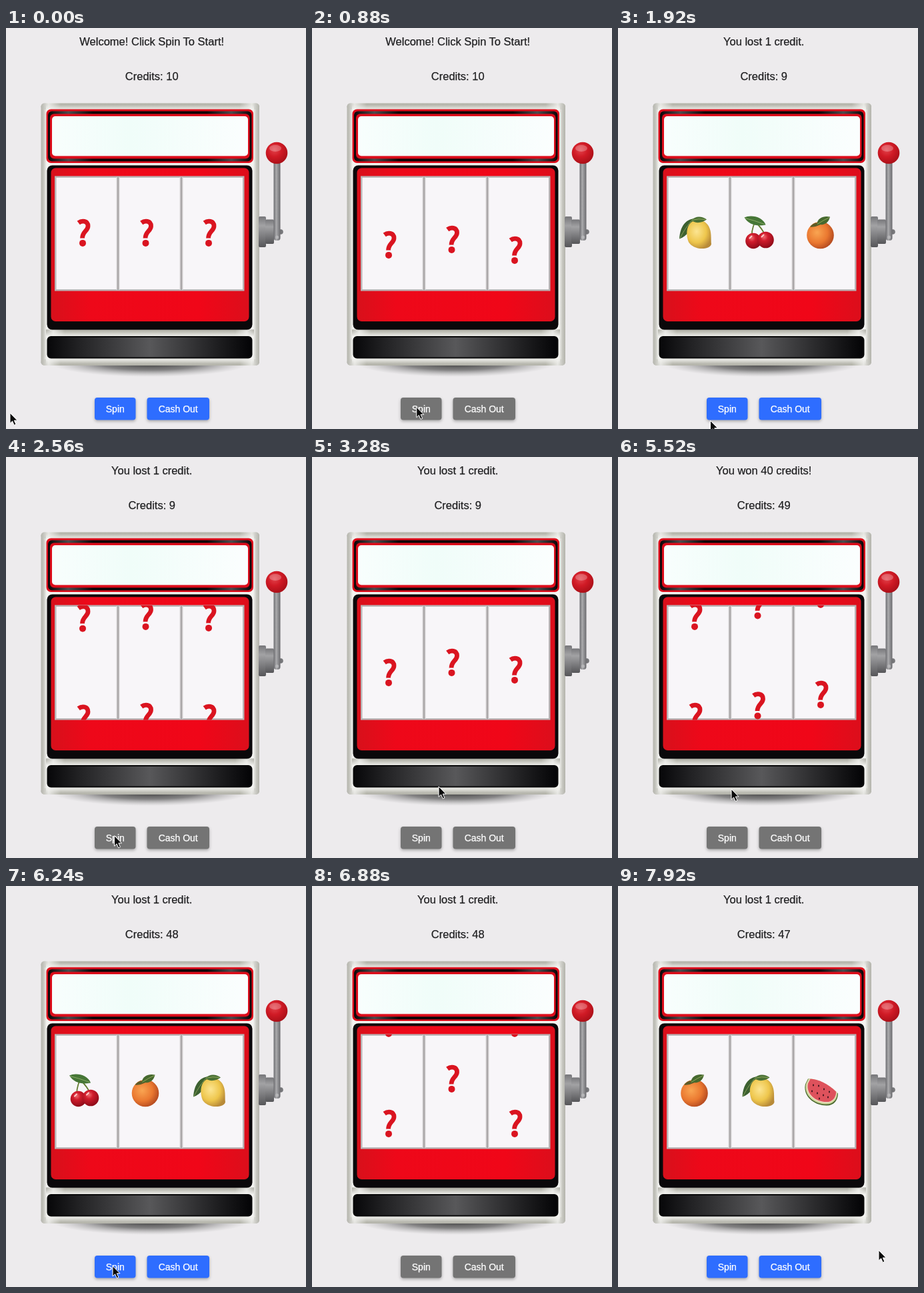
These frames come from a looping animation (450x600 px, 8 s). An HTML page:

```html
<!DOCTYPE html>
<html lang="en">
<head>
<meta charset="utf-8">
<title>Slot machine</title>
<style>
html, body { margin: 0; width: 100%; height: 100%; overflow: hidden; background: #edebed; }
svg { display: block; width: 450px; height: 600px; }
text { font-family: "Liberation Sans", Arial, sans-serif; text-anchor: middle; stroke-width: .25px; }
.line { font-size: 16.5px; fill: #202022; stroke: #202022; }
.label { font-size: 14px; fill: #fff; stroke: #fff; }
.button { fill: #2e6dff; filter: drop-shadow(0 2px 2px rgba(0,0,0,.3)); }
.busy .button { fill: #747474; }
</style>
</head>
<body>
<svg id="stage" viewBox="0 0 450 600">
  <defs>
    <linearGradient id="shell">
      <stop offset="0" stop-color="#b4b4ac"/><stop offset=".012" stop-color="#c6c6bf"/>
      <stop offset=".026" stop-color="#f4f4f1"/><stop offset=".5" stop-color="#f0f0ed"/>
      <stop offset=".972" stop-color="#f4f4f1"/><stop offset=".987" stop-color="#c6c6bf"/>
      <stop offset="1" stop-color="#b4b4ac"/>
    </linearGradient>
    <linearGradient id="band">
      <stop offset="0" stop-color="#b4b4ac"/><stop offset=".035" stop-color="#e6e6e2"/>
      <stop offset=".09" stop-color="#b3b3a9"/><stop offset=".91" stop-color="#b3b3a9"/>
      <stop offset=".965" stop-color="#e6e6e2"/><stop offset="1" stop-color="#b4b4ac"/>
    </linearGradient>
    <linearGradient id="fade" x2="0" y2="1">
      <stop offset="0" stop-color="#f4f4f1" stop-opacity="0"/><stop offset=".3" stop-color="#f4f4f1" stop-opacity=".1"/>
      <stop offset="1" stop-color="#f4f4f1" stop-opacity=".9"/>
    </linearGradient>
    <linearGradient id="steel">
      <stop offset="0" stop-color="#6c6c70"/><stop offset=".4" stop-color="#aaaaac"/><stop offset="1" stop-color="#6a6a6e"/>
    </linearGradient>
    <linearGradient id="mount" x2="0" y2="1">
      <stop offset="0" stop-color="#77777a"/><stop offset=".3" stop-color="#a2a2a4"/><stop offset="1" stop-color="#565659"/>
    </linearGradient>
    <linearGradient id="tray">
      <stop offset="0" stop-color="#08080a"/><stop offset=".15" stop-color="#222224"/>
      <stop offset=".5" stop-color="#58585a"/><stop offset=".85" stop-color="#1c1c1e"/><stop offset="1" stop-color="#040406"/>
    </linearGradient>
    <linearGradient id="rim">
      <stop offset="0" stop-color="#0c0405"/><stop offset=".1" stop-color="#4c4c4e"/><stop offset=".22" stop-color="#0a0506"/>
      <stop offset=".78" stop-color="#0a0506"/><stop offset=".9" stop-color="#4c4c4e"/><stop offset="1" stop-color="#0c0405"/>
    </linearGradient>
    <linearGradient id="red">
      <stop offset="0" stop-color="#d8101b"/><stop offset=".2" stop-color="#ee0819"/>
      <stop offset=".75" stop-color="#f00618"/><stop offset="1" stop-color="#dc0e1b"/>
    </linearGradient>
    <linearGradient id="glass">
      <stop offset="0" stop-color="#f8fefd"/><stop offset=".4" stop-color="#f0fdf9"/><stop offset="1" stop-color="#fbfefe"/>
    </linearGradient>
    <radialGradient id="shadow">
      <stop offset="0" stop-color="#333" stop-opacity=".95"/><stop offset=".5" stop-color="#555" stop-opacity=".7"/>
      <stop offset="1" stop-color="#999" stop-opacity="0"/>
    </radialGradient>
    <radialGradient id="ball" cx=".4" cy=".35" r=".65">
      <stop offset="0" stop-color="#e2444c"/><stop offset=".5" stop-color="#d01a25"/><stop offset="1" stop-color="#ac1019"/>
    </radialGradient>
    <radialGradient id="peel" cx=".38" cy=".4" r=".65">
      <stop offset="0" stop-color="#f9a552"/><stop offset=".6" stop-color="#ea7830"/><stop offset="1" stop-color="#b44a20"/>
    </radialGradient>
    <radialGradient id="zest" cx=".4" cy=".4" r=".65">
      <stop offset="0" stop-color="#fce592"/><stop offset=".6" stop-color="#eec64c"/><stop offset="1" stop-color="#b88a38"/>
    </radialGradient>
    <radialGradient id="skin" cx=".4" cy=".32" r=".7">
      <stop offset="0" stop-color="#ee6c70"/><stop offset=".35" stop-color="#d01c2c"/><stop offset="1" stop-color="#8c0a18"/>
    </radialGradient>
    <clipPath id="window"><rect x="73" y="222" width="284" height="171.5"/></clipPath>

    <g id="query">
      <path d="M-8.3-15C-3.5-18.7 6-18.8 6-10 6-3-2.5-2-2.5 8" fill="none" stroke="#da1420" stroke-width="6.8"/>
      <circle cx="-2" cy="15.4" r="5" fill="#da1420"/>
    </g>
    <path id="wedge" d="M-21-18C-8-18 10-10 24 4 24 14 18 22 7 22-12 22-29 8-25-10Z"/>
    <g id="melon">
      <use href="#wedge" fill="#4b6a30"/>
      <use href="#wedge" fill="#cdd69a" transform="translate(0 -1) scale(.96)"/>
      <use href="#wedge" fill="#f0d8c4" transform="translate(.3 -1.8) scale(.9)"/>
      <use href="#wedge" fill="#de525c" transform="translate(.5 -2.300) scale(.86)"/>
      <path d="M-13-9v1M-5-8v1M3-3v1M11 1v1M-15 0v1M-7 3v1M2 6v1M9 9v1M-4 11v1" stroke="#4a1820" stroke-width="2" stroke-linecap="round"/>
    </g>
    <g id="lemon">
      <path d="M-4-21C-15-20-24-10-25 9-13 5-6-6-4-21Z" fill="#3c6030"/>
      <path d="M-5-20C-12-12-18-4-24 8" fill="none" stroke="#88a058"/>
      <path d="M-8-15C0-22 13-20 19-10 24-1 22 8 23 17 22 20 20 21 18 22 7 26-6 22-11 14-15 4-15-8-8-15Z" fill="url(#zest)"/>
      <path d="M-7-19C0-26 9-25 16-20 9-15 0-13-7-19Z" fill="#4a7034"/>
      <path d="M-6-19Q4-22 14-20" fill="none" stroke="#90a860"/>
    </g>
    <g id="cherry">
      <path d="M-6-17C-10-7-12 2-10 8M-6-17C2-9 7-3 9 4" fill="none" stroke="#637c30" stroke-width="1.800"/>
      <path d="M-22-23C-12-28 6-24 10-12-4-9-16-13-22-23Z" fill="#467636"/>
      <path d="M-21-22Q-8-19 8-13" fill="none" stroke="#8cac68"/>
      <circle cx="-8.500" cy="12" r="11.800" fill="url(#skin)"/>
      <circle cx="10" cy="10.500" r="12.300" fill="url(#skin)"/>
      <path d="M-14 8l3-3M4 6l3-3" stroke="#fcc" stroke-width="2" stroke-linecap="round"/>
    </g>
    <g id="orange">
      <circle cx="-2.500" cy="3.500" r="20.300" fill="url(#peel)"/>
      <path d="M-9-15Q-14-14-18-9-11-8-3-12Z" fill="#5c5c28"/>
      <path d="M-8-13C-6-23 3-26 12-24 10-15 3-10-8-13Z" fill="#46692f"/>
      <path d="M-7-13Q2-19 11-23" fill="none" stroke="#90a858"/>
    </g>
  </defs>

  <rect width="450" height="600" fill="#edebed"/>
  <text class="line" id="title" x="218.700" y="25.800"></text>
  <text class="line" id="credits" x="218.700" y="77.500"></text>

  <ellipse cx="216" cy="502" rx="148" ry="20" fill="url(#shadow)"/>
  <rect x="52.500" y="112.500" width="327.500" height="392.500" rx="6" fill="url(#shell)"/>
  <g id="edge">
    <rect x="52.500" y="112.500" width="327.500" height="9.500" rx="5" fill="url(#band)"/>
    <rect x="60" y="112.500" width="312" height="9.500" fill="url(#fade)"/>
  </g>
  <use href="#edge" transform="matrix(1 0 0 -1 0 617.500)"/>
  <rect x="60" y="451" width="312" height="10" fill="url(#band)"/>
  <rect x="60" y="451" width="312" height="10" fill="url(#fade)"/>

  <rect x="60.500" y="121.500" width="310.500" height="80.500" rx="7" fill="#dc0d1b"/>
  <rect x="63" y="124.500" width="305.500" height="75" rx="6" fill="url(#rim)"/>
  <rect x="66" y="128.500" width="299.500" height="67" rx="6" fill="#dc0d1b"/>
  <rect x="69" y="132" width="294" height="59.500" rx="5" fill="url(#glass)"/>

  <rect x="61.500" y="205.500" width="308" height="246" rx="8" fill="#0a080a"/>
  <rect x="67.500" y="209.500" width="297" height="229.500" rx="7" fill="url(#red)"/>
  <rect x="73" y="221.500" width="284.500" height="172" fill="#b9b4b5"/>
  <rect x="75.500" y="224" width="279.500" height="167" fill="#f8f6f9"/>
  <path d="M168 223V392M263 223V392" stroke="#d8d5d7" stroke-width="5"/>
  <path d="M168 223V392M263 223V392" stroke="#aaa7a8" stroke-width="2.500"/>
  <g id="reels" clip-path="url(#window)"></g>
  <rect x="61.500" y="461" width="308" height="33.500" rx="6" fill="#080809"/>
  <rect x="64" y="463" width="303" height="29.500" rx="5" fill="url(#tray)"/>

  <rect x="379" y="282" width="11" height="46" rx="2" fill="url(#mount)"/>
  <rect x="389" y="286.500" width="13" height="36.500" rx="2" fill="url(#mount)"/>
  <circle cx="412" cy="305" r="3.800" fill="#77777a"/>
  <rect x="401.500" y="198" width="10" height="120" rx="4" fill="url(#steel)"/>
  <circle cx="406.500" cy="313" r="2.500" fill="#b5b5b7"/>
  <circle cx="406" cy="187" r="16.300" fill="url(#ball)"/>
  <ellipse cx="404" cy="180" rx="9" ry="5" fill="#fff" opacity=".25"/>

  <g id="buttons">
    <rect class="button" x="133" y="553" width="61.500" height="33.500" rx="4"/>
    <rect class="button" x="211.500" y="553" width="93.500" height="33.500" rx="4"/>
    <text class="label" x="163.800" y="574.500">Spin</text>
    <text class="label" x="258.200" y="574.500">Cash Out</text>
  </g>
  <path id="cursor" d="M0 0V15.500L3.600 12.200 6.200 18.200 8.900 17 6.300 11.200H11Z" fill="#0a0a0a" stroke="#fff"/>
</svg>
<script>
const LOOP = 8000, STEP = 80, PITCH = 150, MID = 306.5;
const COLUMNS = [117, 211.5, 306];
const LOST = "You lost 1 credit.";

// travel: pixels each reel has moved after `at` ms of spinning
const spins = [
  { start: 560, end: 1600, at: 800, travel: [420, 400, 440], title: LOST, credits: 9, fruit: ["lemon", "cherry", "orange"] },
  { start: 2400, end: 3440, at: 880, travel: [466, 451, 462], title: "You won 40 credits!", credits: 49, fruit: ["melon", "melon", "melon"] },
  { start: 5120, end: 6080, at: 400, travel: [232, 215.5, 199], title: LOST, credits: 48, fruit: ["cherry", "orange", "lemon"] },
  { start: 6400, end: 7360, at: 480, travel: [199, 282, 199], title: LOST, credits: 47, fruit: ["orange", "lemon", "melon"] }
];
const idle = { title: "Welcome! Click Spin To Start!", credits: 10, fruit: ["query", "query", "query"] };

// time, x, y
const path = [
  [0, 6, 576], [480, 155, 566], [1200, 158, 568], [1600, 150, 574], [1920, 138.5, 587.5],
  [2320, 160, 570], [2640, 163, 566], [3280, 190, 493], [3520, 190, 506], [3840, 192, 612],
  [4720, 165, 612], [5040, 160, 570], [5160, 160, 568], [5520, 170, 497], [6160, 160, 568],
  [6400, 160, 570], [6800, 170, 612], [7360, 400, 612], [7760, 391, 545], [8000, 391, 545]
];

const $ = id => document.getElementById(id);
const reels = COLUMNS.map(() => [0, 1].map(() =>
  $("reels").appendChild(document.createElementNS("http://www.w3.org/2000/svg", "use"))));

function place(el, name, x, y) {
  el.setAttribute("href", "#" + name);
  el.setAttribute("transform", `translate(${x} ${y})`);
}

function cursorAt(t) {
  const i = path.findIndex(p => p[0] > t);
  const [a, b] = [path[i - 1], path[i]];
  const p = (t - a[0]) / (b[0] - a[0]), e = p * p * (3 - 2 * p);
  return [1, 2].map(k => a[k] + (b[k] - a[k]) * e);
}

function draw(t) {
  const active = spins.find(s => t >= s.start && t < s.end);
  const result = spins.filter(s => t >= s.end).pop() || idle;
  $("title").textContent = result.title;
  $("credits").textContent = "Credits: " + result.credits;
  $("buttons").classList.toggle("busy", !!active);
  reels.forEach(([main, above], i) => {
    const x = COLUMNS[i];
    const shift = active ? active.travel[i] * (t - active.start) / active.at % PITCH : 0;
    place(main, active ? "query" : result.fruit[i], x, MID + shift);
    place(above, "query", x, MID + shift - PITCH);
  });
  $("cursor").setAttribute("transform", `translate(${cursorAt(t)})`);
}

const origin = performance.now();
function tick() {
  const t = (performance.now() - origin) % LOOP;
  draw(Math.floor(t / STEP) * STEP);
  requestAnimationFrame(tick);
}
tick();
</script>
</body>
</html>
```
